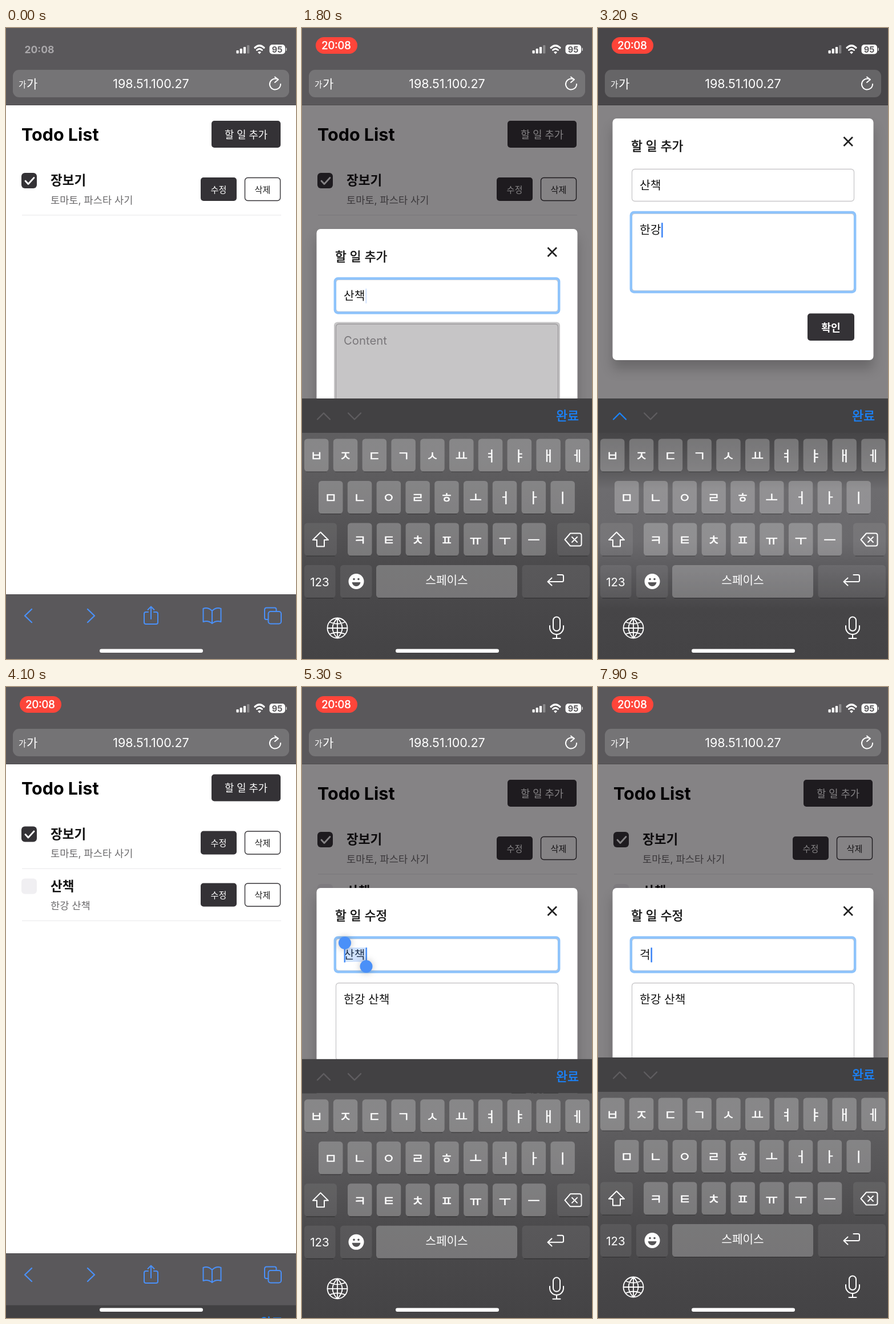
Recreate the animation shown at these times as an HTML page. Size 508 px wide and 1102 px high, loop 8000 ms.

```html
<!DOCTYPE html>
<html lang="ko">
<head>
<meta charset="utf-8">
<title>Todo List</title>
<style>
  html, body { margin: 0; width: 100%; height: 100%; overflow: hidden; background: #fff; }
  svg { display: block; width: 100%; height: 100%; }
  text { font-family: Inter, "Noto Sans CJK KR", "Noto Sans CJK", sans-serif; white-space: pre; }
  .card { filter: drop-shadow(0 16px 10px rgba(0, 0, 0, .2)); }
  .knob { filter: drop-shadow(0 0 6px rgba(0, 0, 0, .25)); }
</style>
</head>
<body>
<svg id="stage" viewBox="0 0 508 1102"></svg>
<script>
const LOOP = 8000, SCROLL = 193, KEYS_H = 455;
const DARK = '#343236', BLUE = '#4a90f8', LINK = '#1a84fe', CHROME = '#5a585b';

// Drawing helpers: text takes the vertical middle of its line
const rect = (x, y, w, h, r, fill, more = '') =>
  `<rect x="${x}" y="${y}" width="${w}" height="${h}" rx="${r}" fill="${fill}" ${more}/>`;
const text = (x, y, size, str, fill = '#111', more = '') =>
  `<text x="${x}" y="${y + size * .37}" font-size="${size}" fill="${fill}" ${more}>${str}</text>`;
const mid = (x, y, size, str, fill, more = '') =>
  text(x, y, size, str, fill, 'text-anchor="middle" ' + more);
const medium = color => `stroke="${color}" stroke-width=".5"`;
const line = (d, color = '#fff', width = 2, more = '') =>
  `<path d="${d}" fill="none" stroke="${color}" stroke-width="${width}" stroke-linecap="round" stroke-linejoin="round" ${more}/>`;
const dot = (x, y, r, fill, more = '') => `<circle cx="${x}" cy="${y}" r="${r}" fill="${fill}" ${more}/>`;
const group = (id, ...parts) => `<g id="${id}">${parts.join('')}</g>`;
const gradient = (id, stops) =>
  `<linearGradient id="${id}" x2="0" y2="1">${stops.map(([at, c]) =>
    `<stop offset="${at}" stop-color="${c}"/>`).join('')}</linearGradient>`;

const item = (y, title, note, done) =>
  rect(27, y + 2, 27, 27, 6, done ? DARK : '#f0eff2') +
  (done ? line(`M34 ${y + 16}l5 5.5 10-11`, '#fff', 2.8) : '') +
  text(78, y + 15, 22.5, title, '#111', 'font-weight="700"') +
  text(78, y + 49, 17.6, note, '#6b6a6c') +
  rect(341, y + 10, 63, 41, 5, DARK) + mid(372.5, y + 31, 15.2, '수정', '#fff') +
  rect(418.5, y + 10.5, 62, 40, 5, '#fff', `stroke="${DARK}" stroke-width="1.4"`) +
  mid(449.5, y + 31, 15.2, '삭제', '#222') +
  rect(28, y + 75, 454, 1.5, 0, '#efeef0');

const field = (id, y, h) =>
  rect(59.5, y, 389, h, 5, '#fff', 'stroke="#c9c8ca" stroke-width="1.3"') +
  rect(57.8, y - 2, 392.4, h + 4, 5, 'none', `id="${id}Ring" stroke="#8ec3fb" stroke-width="4.4"`) +
  text(73, y + 28, 20.3, '', '#111', `id="${id}"`);

const list = group('list',
  text(27, 186, 30.5, 'Todo List', '#000', 'font-weight="700"'),
  rect(360, 162, 121, 47, 5, DARK), mid(420.5, 186, 17.7, '할 일 추가', '#fff'),
  item(251, '장보기', '토마토, 파스타 사기', true),
  group('added', item(342, '산책', '한강 산책', false)));

const modal = group('modal',
  rect(25.5, 351, 457, 422, 7, '#fff', 'class="card"'),
  text(58, 399, 21.5, '', '#111', 'id="heading" ' + medium('#111')),
  line('M430.5 383.5l15.5 15.5m0-15.5l-15.5 15.5', '#222', 2.7, 'style="stroke-linecap:butt"'),
  field('title', 439.5, 56), field('body', 517, 135),
  group('selection', rect(74, 455, 39, 25, 0, 'rgba(74,144,248,.26)'),
    rect(73.5, 455, 2.5, 26, 0, BLUE), rect(111.5, 455, 2.5, 26, 0, BLUE),
    dot(75, 447, 11, BLUE, 'class="knob"'), dot(112.5, 488, 11, BLUE, 'class="knob"')),
  rect(56, 513.5, 396, 142, 6, 'rgba(10,5,12,.23)', 'id="touch"'),
  rect(0, 455, 2.6, 26, 1, '#3f86f6', 'id="caret"'),
  rect(367, 691.5, 82, 47.5, 5, DARK), mid(408, 716, 18.2, '확인', '#fff', 'font-weight="700"'));

const bars = [0, 1, 2, 3].map(i =>
  rect(403.5 + i * 6.2, 39 - i * 3, 4.2, 5.5 + i * 3, 1.2, '#fff', i > 2 ? 'opacity=".3"' : '')).join('');

const header = group('header',
  rect(0, 0, 508, 135, 0, CHROME), rect(0, 0, 508, 135, 0, '#000', 'id="dim"'),
  rect(0, 134, 508, 1, 0, 'rgba(0,0,0,.15)'),
  mid(58.5, 37, 17.6, '20:08', '#aaa8ab', 'id="clock" font-weight="700"'),
  group('pill', rect(24, 16, 73, 29, 14.5, '#ff453a', 'id="pillBack"'),
    mid(60, 30.5, 18.6, '20:08', '#fff', medium('#fff'))),
  bars,
  line('M436 34.5q8-7.5 16 0', '#fff', 3.2), line('M439.5 38.5q4.5-4 9 0', '#fff', 3),
  '<path d="M444 45.5l-3-3.3q3-2.4 6 0z" fill="#fff"/>',
  rect(461.5, 29, 27.5, 16.5, 5, '#fff'), rect(490, 34.5, 2, 5.5, 1, '#bbb'),
  mid(475, 37.5, 14.5, '95', CHROME, 'font-weight="700"'),
  rect(12, 73, 484, 48, 11, 'rgba(255,255,255,.165)'),
  text(22, 99, 14.5, '가', '#fff'), text(36, 97.5, 21, '가', '#fff'),
  mid(254, 97.5, 21.5, '198.51.100.27', '#fff'),
  line('M476.5 90A9.5 9.5 0 1 0 481 98M471 85.5l6 4.5-6 5'));

const toolbar = group('toolbar',
  rect(0, 989, 508, 113, 0, CHROME), rect(0, 989, 508, 1, 0, 'rgba(0,0,0,.12)'),
  line('M45 1015l-12 11.5 12 11.5M143 1015l12 11.5-12 11.5', BLUE, 2.3),
  line('M249 1020h-4q-3 0-3 3v15q0 3 3 3h18q3 0 3-3v-15q0-3-3-3h-4M254 1032v-21M248.5 1016l5.5-5.5 5.5 5.5', BLUE),
  line('M361 1018q-7-7-15.5-4v23q8.5-3 15.5 3 7-6 15.5-3v-23q-8.5-3-15.5 4v22', BLUE),
  line('M459 1033h-3q-3 0-3-3v-14q0-3.5 3.5-3.5h14q3 0 3 3v3', BLUE),
  rect(459.5, 1019, 22.5, 21.5, 4, 'none', `stroke="${BLUE}" stroke-width="2"`));

const key = (x, y, w, name, special) =>
  line(`M${x + 4} ${y + 57.6}h${w - 8}`, 'rgba(0,0,0,.3)', 1.4) +
  rect(x, y, w, 57, 5.5, '#fff', `data-key="${name}" data-tone="${special ? .08 : .25}"`);
const row = (x, y, letters) => [...letters].map((c, i) =>
  key(x + i * 50.8, y, 42.5, c) + mid(x + i * 50.8 + 21.2, y + 29.5, 23.5, c, '#fff', medium('#fff'))).join('');

const keyboard = group('keyboard',
  rect(0, 707, 508, 395, 0, 'url(#calm)'), rect(0, 707, 508, 395, 0, 'url(#lit)', 'id="glow"'),
  rect(0, 647, 508, 60, 0, '#424143'),
  line('M27 683.5l11-11 11 11', '#5f5d60', 2.3, 'id="prev"'),
  line('M81 672.5l11 11 11-11', '#5f5d60', 2.3),
  text(445, 677, 21.8, '완료', LINK, medium(LINK)),
  row(4, 717.5, 'ㅂㅈㄷㄱㅅㅛㅕㅑㅐㅔ'), row(29, 791, 'ㅁㄴㅇㄹㅎㅗㅓㅏㅣ'), row(80, 864.5, 'ㅋㅌㅊㅍㅠㅜㅡ'),
  key(4, 864.5, 57, 'shift', 1), line('M32.5 880.5l13.5 13.5h-7v11.5h-13v-11.5h-7z'),
  key(447, 864.5, 57, 'del', 1),
  line('M470 882.5h16q3.5 0 3.5 3.5v15q0 3.5-3.5 3.5h-16l-9.5-11zM473 889l9 9m0-9l-9 9'),
  key(4, 938, 54.5, '123', 1), mid(31, 967, 20.5, '123', '#fff'),
  key(67, 938, 55.5, 'face', 1), dot(95, 966.5, 13.5, '#fff'),
  dot(91, 962.5, 1.8, '#555456'), dot(99, 962.5, 1.8, '#555456'),
  '<path d="M87.5 968h15q-1.500 7-7.500 7t-7.500-7z" fill="#555456"/>',
  key(130, 938, 247, 'space'), mid(253.5, 964.5, 20.2, '스페이스', '#fff'),
  key(385.5, 938, 118.5, 'enter', 1),
  line('M437.5 960.5l-7 6.5 7 6.5M431 967h24.5q2.5 0 2.5-2.5v-7q0-2.5-2.5-2.5h-8'),
  line('M44.5 1048a17.5 17.5 0 1 0 35 0a17.5 17.5 0 1 0-35 0zh35M62 1030.5v35' +
    'M62 1030.5q-17 17.5 0 35q17-17.5 0-35M48.5 1037.5q13.5 6 27 0M48.5 1058.5q13.5-6 27 0', '#fff', 1.8),
  rect(440, 1028.5, 12, 24.5, 6, 'none', 'stroke="#fff" stroke-width="2"'),
  line('M434 1044v3a12 12 0 0 0 24 0v-3M446 1059v6.5M439.5 1066h13'));

const stage = document.getElementById('stage');
stage.innerHTML = '<defs>' +
  gradient('calm', [[0, '#5f5e60'], [.1, '#605f61'], [.35, '#575658'], [.6, '#4b4a4c'], [1, '#444345']]) +
  gradient('lit', [[0, '#464547'], [.15, '#565557'], [.25, '#6d6c6f'], [.48, '#6a696c'], [.62, '#5a595c'], [.78, '#464547'], [1, '#444345']]) +
  '</defs>' + rect(0, 0, 508, 1102, 0, '#fff') + list +
  rect(0, 135, 508, 967, 0, 'rgba(7,4,8,.49)', 'id="shade"') +
  modal + header + toolbar + keyboard + rect(164, 1084.5, 181, 6.5, 3.25, '#fff');

const el = {};
stage.querySelectorAll('[id]').forEach(n => el[n.id] = n);
const keyCaps = [...stage.querySelectorAll('[data-key]')];

// Keystrokes: time, key, resulting text
const newTitle = [[1000, 'ㅅ', 'ㅅ'], [1120, 'ㅏ', '사'], [1240, 'ㄴ', '산'], [1380, 'ㅊ', '산ㅊ'],
  [1490, 'ㅐ', '산채'], [1610, 'ㄱ', '산책']];
const newBody = [[2480, 'ㅎ', 'ㅎ'], [2600, 'ㅏ', '하'], [2710, 'ㄴ', '한'], [2850, 'ㄱ', '한ㄱ'],
  [2960, 'ㅏ', '한가'], [3100, 'ㅇ', '한강'], [3230, 'space', '한강 '], [3310, 'ㅅ', '한강 ㅅ'],
  [3390, 'ㅏ', '한강 사'], [3460, 'ㄴ', '한강 산'], [3540, 'ㅊ', '한강 산ㅊ'], [3610, 'ㅐ', '한강 산채'],
  [3690, 'ㄱ', '한강 산책']];
const editTitle = [[0, '', '산책'], [6800, 'del', ''], [7000, 'ㄱ', 'ㄱ'], [7220, 'ㅓ', '거'], [7640, 'ㄱ', '걱']];
const latest = (strokes, t) => strokes.filter(s => s[0] <= t).pop() || [0, '', ''];

const spring = (t, start) => {
  const x = Math.max(0, t - start) * .01826;
  return 1 - (1 + x) * Math.exp(-x);
};
const show = (node, on) => node.style.display = on ? '' : 'none';
const move = (node, y, x = 0) => node.setAttribute('transform', `translate(${x} ${y})`);
const fill = (node, str, hint) => {
  node.textContent = str || hint;
  node.setAttribute('fill', str ? '#111' : '#9b999c');
};

function draw(t) {
  const editing = t >= 4880, open = editing || (t >= 450 && t < 3800);
  const inBody = !editing && t >= 1940;
  const selected = editing && t < 6800;
  const touched = t >= 1750 && t < 1940;
  const scrolled = spring(t, 1950) - spring(t, 3840);
  const raised = spring(t, 500) - spring(t, 3840) + spring(t, 4908);

  move(el.list, -SCROLL * scrolled);
  move(el.modal, -SCROLL * scrolled);
  move(el.keyboard, KEYS_H * (1 - raised));
  el.dim.setAttribute('opacity', .2 * scrolled);
  el.glow.setAttribute('opacity', scrolled);
  el.prev.setAttribute('stroke', inBody && t < 3840 ? LINK : '#5f5d60');

  show(el.added, t >= 3800);
  show(el.shade, open);
  show(el.modal, open);
  show(el.titleRing, !inBody);
  show(el.bodyRing, inBody);
  show(el.touch, touched);
  show(el.selection, selected);
  move(el.selection, 4 * (1 - raised), 3 * (1 - raised));

  const title = latest(editing ? editTitle : newTitle, t);
  const body = latest(newBody, t);
  el.heading.textContent = editing ? '할 일 수정' : '할 일 추가';
  fill(el.title, title[2], 'Title');
  fill(el.body, body[2], 'Content');

  const active = inBody ? body : title, node = inBody ? el.body : el.title;
  const idle = t - (active[0] || 500);
  show(el.caret, open && !selected && (idle < 600 || idle % 1000 < 600 || touched));
  el.caret.setAttribute('opacity', touched ? .2 : 1);
  if (open) el.caret.setAttribute('x', 73.7 + (active[2] ? node.getComputedTextLength() : 0));
  move(el.caret, inBody ? 78 : 0);

  const pressed = t - active[0] < 90 ? active[1] : '';
  keyCaps.forEach(k => k.setAttribute('fill-opacity',
    k.dataset.key === pressed ? .16 : k.dataset.tone));

  // Recording pill fades in, then pulses softly
  const on = Math.min(1, Math.max(0, (t - 100) / 200));
  const pulse = Math.cos(Math.PI * (t - 6300) / 2600) ** 16;
  el.clock.setAttribute('opacity', 1 - on);
  el.pill.setAttribute('opacity', on);
  el.pillBack.setAttribute('opacity', 1 - .13 * pulse);
}

function tick() {
  draw(performance.now() % LOOP);
  requestAnimationFrame(tick);
}
tick();
</script>
</body>
</html>
```
